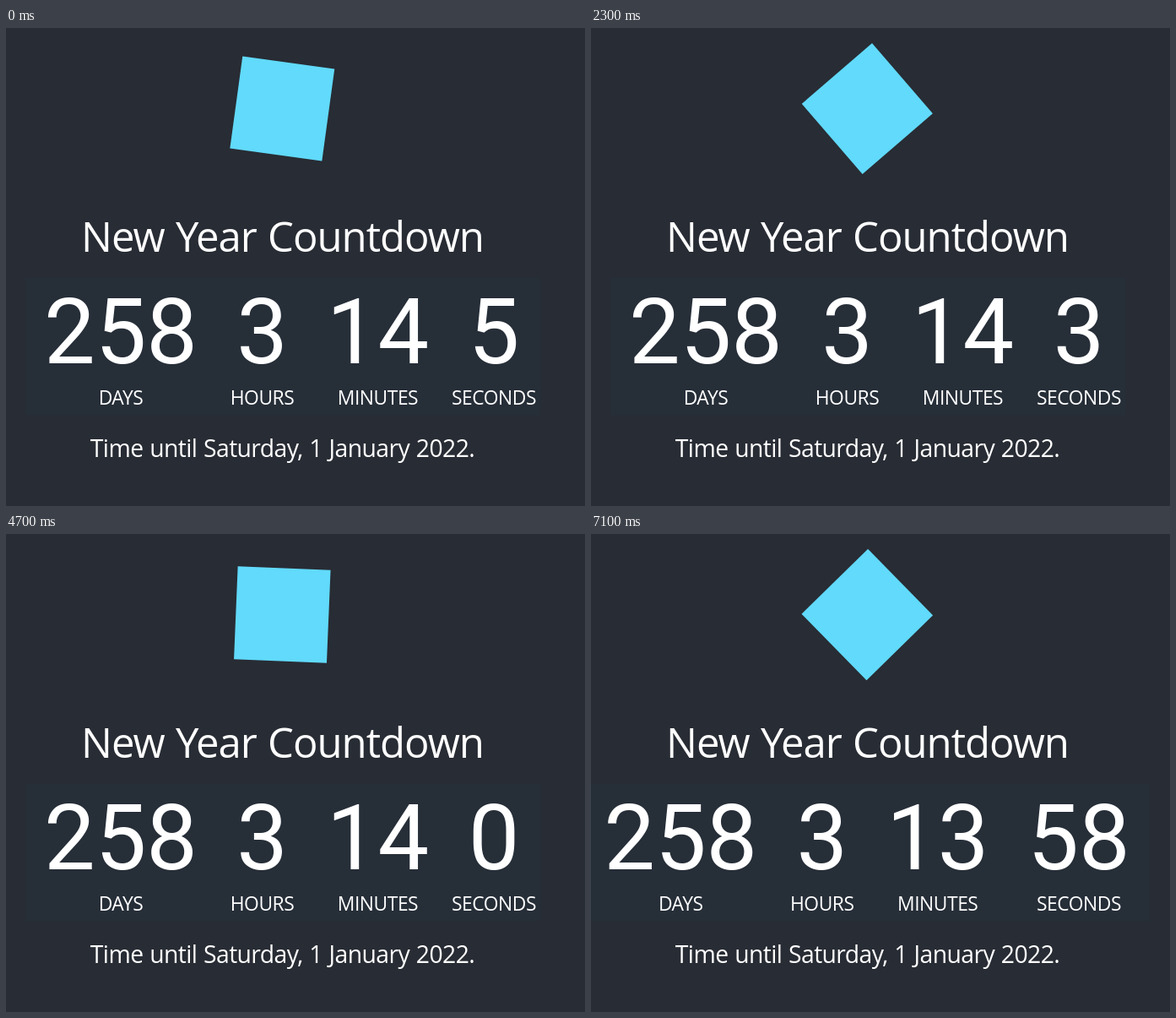
Animation of 686x566 px, one loop 7.2 s. Source, as an HTML page:

```html
<!DOCTYPE html>
<html lang="en">
<head>
<meta charset="utf-8">
<title>New Year Countdown</title>
<style>
  html, body { margin: 0; width: 100%; height: 100%; overflow: hidden; background: #282c34; }
  svg { display: block; }
  text { fill: #fff; text-anchor: middle; font-family: "Open Sans", "Noto Sans", sans-serif; letter-spacing: -.02em; word-spacing: .03em; }
  .title { font-size: 49px; }
  .label { font-size: 22.8px; }
  .note { font-size: 28.3px; }
  .number { font-family: Roboto, "Liberation Sans", sans-serif; font-size: 108px; letter-spacing: 0; }
</style>
</head>
<body>
<svg width="686" height="566" viewBox="0 0 686 566">
  <rect id="badge" x="-55" y="-55" width="110" height="110" fill="#61dafb"/>
  <text class="title" x="327.5" y="265">New Year Countdown</text>
  <rect id="panel" y="296" height="162" fill="#262e38"/>
  <g id="units"></g>
  <text class="note" x="327.5" y="508">Time until Saturday, 1 January 2022.</text>
</svg>
<script>
const LOOP = 7200, STEP = 100, FIRST_TICK = 700;
const DIGIT = 59.5;
const START = 14 * 60 + 5;
const DEGREES_PER_MS = 360 / 20000;

const badge = document.getElementById('badge');
const panel = document.getElementById('panel');
const units = document.getElementById('units');

function addText(className, y, content = '') {
  const node = document.createElementNS('http://www.w3.org/2000/svg', 'text');
  node.setAttribute('class', className);
  node.setAttribute('y', y);
  node.textContent = content;
  return units.appendChild(node);
}

const columns = [['DAYS', 136], ['HOURS', 303.5], ['MINUTES', 440.5], ['SECONDS', 578]]
  .map(([name, x]) => ({ x, number: addText('number', 397), label: addText('label', 446, name) }));

function draw(t) {
  const ticks = Math.max(0, Math.floor((t - FIRST_TICK) / 1000) + 1);
  const left = START - ticks;
  const seconds = left % 60;
  const values = [258, 3, Math.floor(left / 60), seconds];
  // A second digit widens the centred row on both sides.
  const grow = seconds > 9 ? DIGIT / 2 : 0;

  columns.forEach(({ x, number, label }, i) => {
    const at = i < 3 ? x - grow : x;
    number.setAttribute('x', at);
    label.setAttribute('x', at);
    number.textContent = values[i];
  });
  panel.setAttribute('x', 23.5 - grow);
  panel.setAttribute('width', 609 + 2 * grow);
  badge.setAttribute('transform', `translate(327.3 95.5) rotate(${7.8 + t * DEGREES_PER_MS})`);
}

const begin = performance.now();
function frame() {
  const t = (performance.now() - begin) % LOOP;
  draw(Math.floor(t / STEP) * STEP);
  requestAnimationFrame(frame);
}
frame();
</script>
</body>
</html>
```
